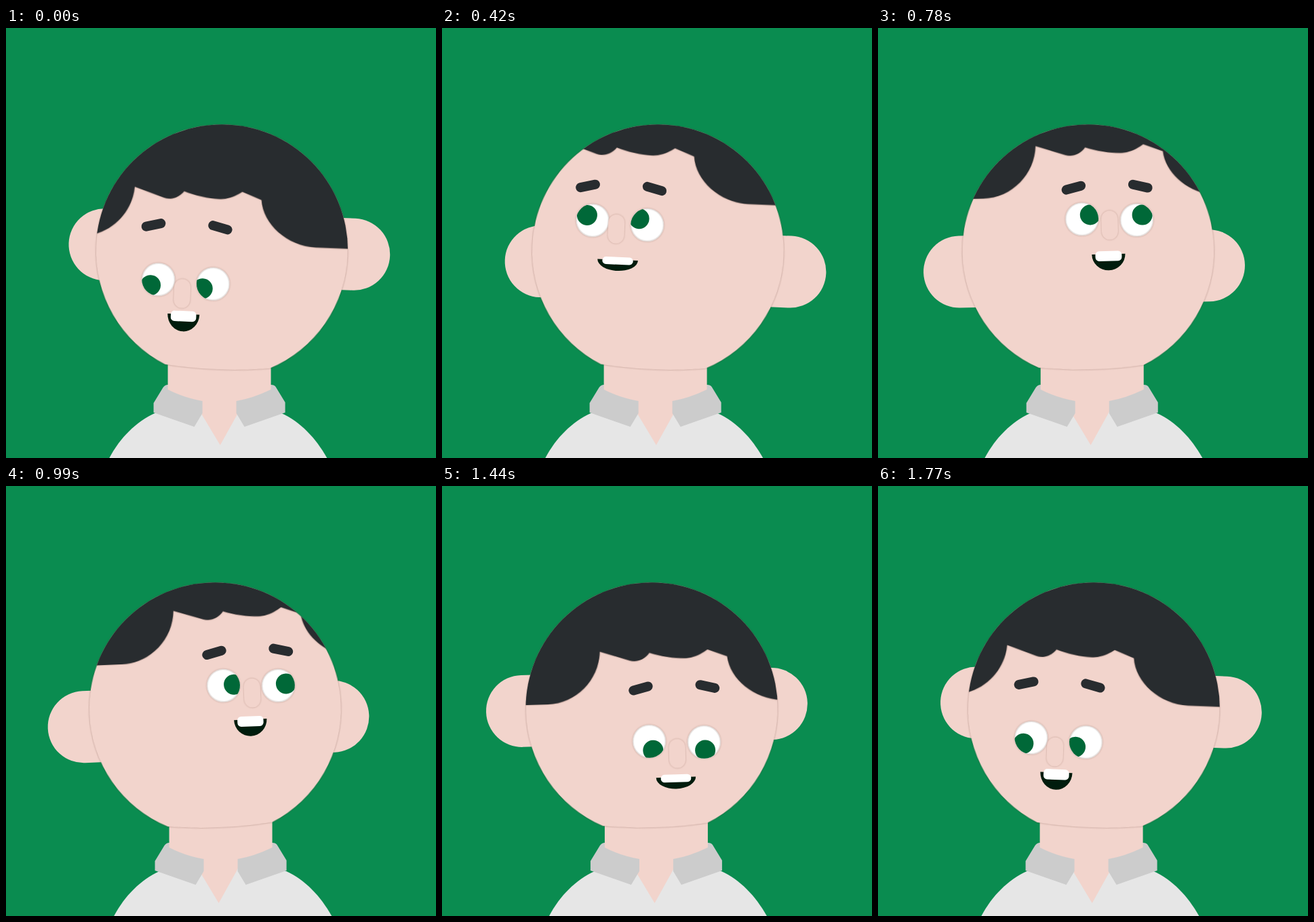
An HTML page for the animation above (1800 ms loop, 634 by 634 pixels).

```html
<!DOCTYPE html>
<html lang="en">
<head>
<meta charset="utf-8">
<title>Looking around</title>
<style>
  html, body { margin: 0; width: 100%; height: 100%; overflow: hidden; background: #0a8c50; }
  svg { display: block; width: 100vw; height: 100vh; }
  .skin { fill: #f2d4cc; }
  .dark { fill: #282c2f; }
  .soft { filter: drop-shadow(.5px .5px 1px rgba(60, 20, 10, .4)); }
  .faint { filter: drop-shadow(.3px .5px .8px rgba(90, 40, 25, .35)); }
  .brow { stroke: #282c2f; stroke-width: 14; stroke-linecap: round; }
  .eye { fill: #fff; stroke: #e6e2e0; stroke-width: 1.6; }
  .pupil { fill: #006838; }
</style>
</head>
<body>
<svg viewBox="0 0 634 634">
  <defs>
    <clipPath id="skull"><circle id="skullEdge" cy="328" r="185.8"/></clipPath>
    <clipPath id="eyeEdge"><circle r="24.4"/></clipPath>
  </defs>

  <path id="shirt" fill="#e6e6e6" d="M153 634C169 604 192 581 220 568L290 556H340L407 568C435 581 457 604 474 634Z"/>
  <g id="bust">
    <path id="chest" class="skin" d="M280 535H352V562H345L341 570L316 615L289 570V562H280Z"/>
    <path fill="#ccc" d="M239 526Q235 526 232 530L218 553V567L278 588L290 568V545L250 526Z
      M391 526Q396 526 398 529L412 552V567L352 588L340 568V545L380 526Z"/>
    <path class="skin" d="M239 470H391V533Q364 546 340 550H290Q262 545 239 533Z"/>
  </g>

  <g id="ears" class="skin">
    <path d="M-150 -53H-184A53 53 0 0 0 -184 53H-150Z"/>
    <path d="M150 -53H184A53 53 0 0 1 184 53H150Z"/>
  </g>
  <path id="head" class="skin soft" d="M-185.5 0A185.5 185.5 0 0 1 185.5 0A187.5 187.5 0 0 1 77 171Q0 180 -77 171A187.5 187.5 0 0 1 -185.5 0Z"/>
  <g clip-path="url(#skull)">
    <path id="hair" class="dark faint" d="M-116 -2.5L-72 12C-62 15 -50 11 -43 1.2C-24 8 4 12.5 18 10C28 8 37 3 42.8 -1.2L71.5 9.7C75 45 112 76 154 76.5H300V-300H-350V73H-195C-152 73 -118 38 -116 -2.5Z"/>
  </g>

  <g id="brows" class="brow">
    <path d="M-60 2.7L-38.4 -2.7"/>
    <path d="M38.4 -2.7L60 2.7"/>
  </g>
  <g id="eyes">
    <g transform="translate(-40.4 -1.7)">
      <circle r="23.8" class="eye faint"/>
      <g clip-path="url(#eyeEdge)"><circle class="pupil" r="15"/></g>
    </g>
    <g transform="translate(40.4 1.7)">
      <circle r="23.8" class="eye faint"/>
      <g clip-path="url(#eyeEdge)"><circle class="pupil" r="15"/></g>
    </g>
  </g>
  <rect id="nose" class="skin faint" x="-12" y="-21.5" width="24" height="43" rx="12"/>
  <g id="mouth">
    <path id="lips" fill="#001c0d"/>
    <rect id="teeth" fill="#fff" rx="5.5"/>
  </g>
</svg>
<script>
const LOOP = 1800, STEP = 30, QUARTER = 450;
const $ = id => document.getElementById(id);
const pupils = document.querySelectorAll('.pupil');

// Gaze corners: bottom left, top left, top right, bottom right
const cornerX = [-1, -1, 1, 1, -1];
const cornerY = [1, -1, -1, 1, 1];
const gaze = [145, 232, 337, 425, 505];

const mix = (list, k, e) => list[k] + (list[k + 1] - list[k]) * e;

function place(id, x, y, angle = 0) {
  $(id).setAttribute('transform', `translate(${x} ${y}) rotate(${angle})`);
}

function setAll(el, attrs) {
  for (const name in attrs) el.setAttribute(name, attrs[name]);
}

function draw(ms) {
  const k = Math.floor(ms / QUARTER);
  const p = ms / QUARTER - k;
  const e = p * p * (3 - 2 * p);
  const bulge = 1 + 0.64 * e * (1 - e);
  const alongY = k % 2 === 0;
  const v = mix(cornerY, k, e) * (alongY ? 1 : bulge);
  const turn = mix(cornerX, k, e) * (alongY ? bulge : 1);
  const u = turn - 0.025 * v * (turn + v);
  const vv = v * v;
  const sway = -0.9 * vv;
  const tilt = -2.27 * u;

  place('shirt', 3.4 + 3.2 * turn + sway, 0);
  place('bust', 1.3 + 0.8 * turn + sway, 0);
  place('chest', -1.8 - 2 * turn, 0);

  const headX = 314.2 - 5 * turn + sway;
  place('ears', 315.4 - 15.2 * turn + 1.4 * sway, 333.5 - 13 * v + 6 * vv, tilt);
  place('head', headX, 328, tilt);
  $('skullEdge').setAttribute('cx', headX);
  place('hair', 335.6 + 26.9 * turn - 5.5 * vv - 2.5 * turn * v, 205.6 + 32.5 * v + 3 * vv, tilt);

  place('brows', 310 + 43.3 * u, 265 + 29 * v + 1.7 * u, tilt);
  place('eyes', 311.5 + 46.5 * u, 327.5 + 44 * v + 2.5 * vv, tilt);
  place('nose', 309.7 + 50 * u, 343.3 + 48.2 * v, tilt);

  const a = mix(gaze, k, e) * Math.PI / 180;
  pupils.forEach((pupil, i) => {
    const side = i ? -1 : 1;
    setAll(pupil, {
      cx: -1 + 15 * Math.cos(a) + 2 * side,
      cy: 1.3 + 12 * Math.sin(a) + 0.7 * side
    });
  });

  const wide = alongY ? e : 1 - e;
  const rx = 23.5 + 6.4 * wide, ry = 25.5 - 9.3 * wide;
  const w = 37.5 + 8 * wide, h = 15.5 - 4.5 * wide;
  place('mouth', 309.5 + 47.7 * u, 375.6 + 43 * v + 3.3 * vv + 5 * wide, tilt);
  $('lips').setAttribute('d', `M${-rx} 0A${rx} ${ry} 0 0 0 ${rx} 0Z`);
  setAll($('teeth'), { x: -w / 2, y: 3 - 1.5 * wide - h / 2, width: w, height: h });
}

const start = performance.now();
function tick() {
  const ms = (performance.now() - start) % LOOP;
  draw(Math.floor(ms / STEP) * STEP);
  requestAnimationFrame(tick);
}
tick();
</script>
</body>
</html>
```
